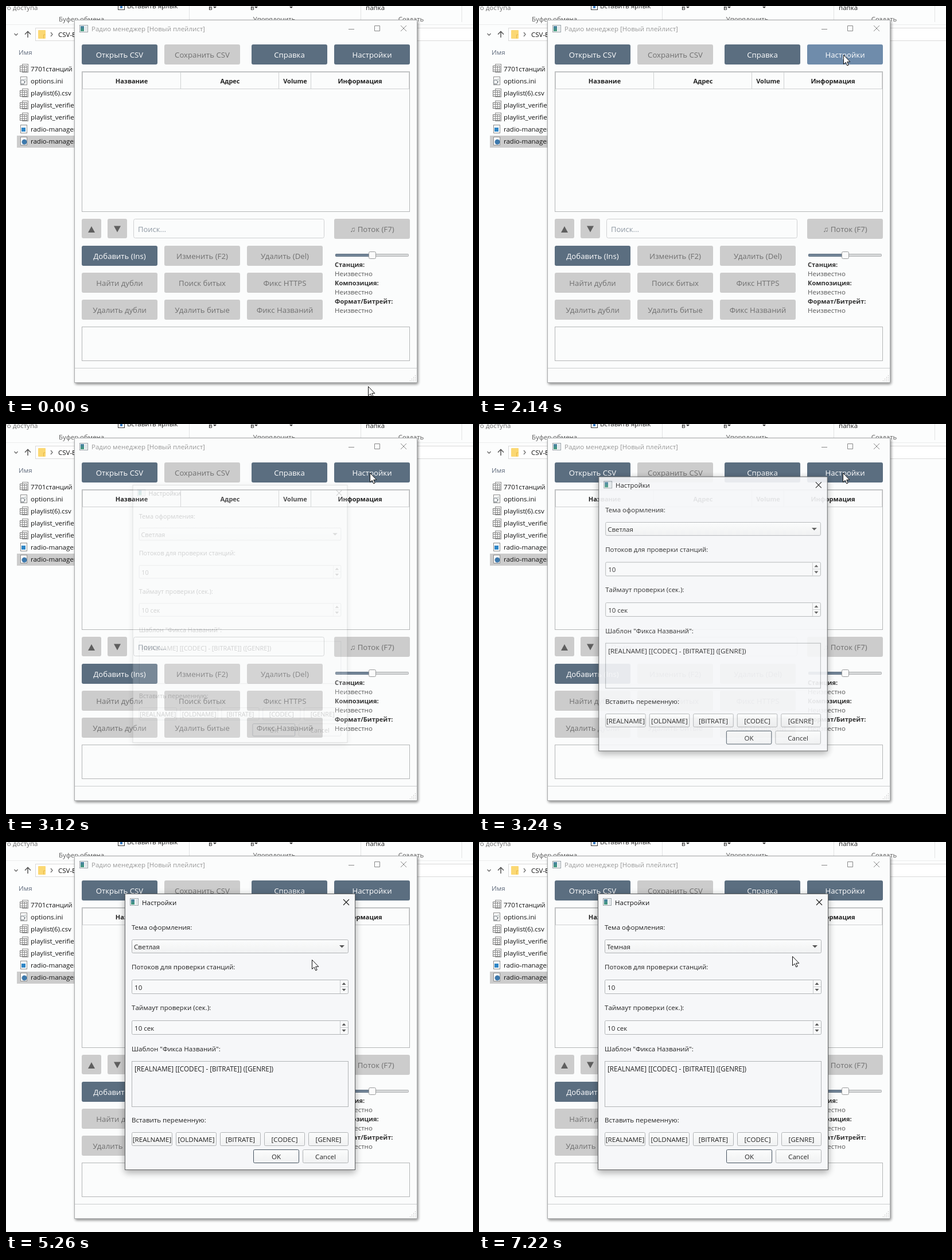
These frames come from a looping animation (814x680 px, 8 s). An HTML page:

```html
<!DOCTYPE html>
<html lang="ru">
<head>
<meta charset="utf-8">
<title>Радио менеджер</title>
<style>
html, body { margin: 0; width: 100%; height: 100%; overflow: hidden; background: #fdfdfd; }
svg { display: block; width: 814px; height: 680px; }
text { font-family: "Open Sans", "Noto Sans", sans-serif; white-space: pre; }
</style>
</head>
<body>
<svg id="stage" viewBox="0 0 814 680" xmlns="http://www.w3.org/2000/svg">
  <defs>
    <filter id="soft" x="-10%" y="-10%" width="120%" height="120%"><feGaussianBlur stdDeviation="2.2"/></filter>
    <filter id="wide" x="-10%" y="-10%" width="120%" height="120%"><feGaussianBlur stdDeviation="6"/></filter>
    <linearGradient id="face" x2="0" y2="1"><stop stop-color="#fbfcfc"/><stop offset="1" stop-color="#f0f1f2"/></linearGradient>
    <linearGradient id="lit" x2="0" y2="1"><stop stop-color="#ffffff"/><stop offset="1" stop-color="#f7f8f9"/></linearGradient>
    <linearGradient id="teal" x2="0" y2="1"><stop stop-color="#4a7fa5"/><stop offset="1" stop-color="#3f9a78"/></linearGradient>
  </defs>
</svg>
<script>
const NS = "http://www.w3.org/2000/svg";
const stage = document.getElementById("stage");
const LOOP = 8000;

function el(parent, tag, attrs, content) {
  const node = document.createElementNS(NS, tag);
  for (const k in attrs) node.setAttribute(k, attrs[k]);
  if (content !== undefined) node.textContent = content;
  parent.appendChild(node);
  return node;
}
const group = (p, attrs = {}) => el(p, "g", attrs);
const rect = (p, x, y, width, height, fill, more = {}) => el(p, "rect", { x, y, width, height, fill, ...more });
const path = (p, d, stroke, more = {}) => el(p, "path", { d, fill: "none", stroke, ...more });
const shape = (p, d, fill) => el(p, "path", { d, fill });
const text = (p, x, y, s, size, fill, more = {}) => el(p, "text", { x, y, "font-size": size, fill, ...more }, s);
const mid = { "text-anchor": "middle" };
const bold = { "font-weight": 700 };

// one pixel outline around whole-pixel bounds
const frame = (p, x1, y1, x2, y2, fill, stroke, rx = 0) =>
  rect(p, x1 + .5, y1 + .5, x2 - x1 - 1, y2 - y1 - 1, fill, { stroke, rx });

function appIcon(p, x, y) {
  frame(p, x, y, x + 15, y + 13, "#f4f6f7", "#9aa3a8");
  rect(p, x + 2, y + 2, 6, 9, "url(#teal)");
  rect(p, x + 10, y + 2, 3, 9, "#dfe5e8");
}

function shadows(p, x, y, w, h) {
  return {
    soft: rect(p, x + 1, y + 2, w + 1, h + 1, "#000", { rx: 4, opacity: .4, filter: "url(#soft)" }),
    wide: rect(p, x - 1, y + 2, w + 2, h + 3, "#000", { rx: 6, opacity: .3, filter: "url(#wide)" })
  };
}

const show = (node, on) => node.setAttribute("visibility", on ? "visible" : "hidden");

/* ---------- file list behind ---------- */
function buildFiles() {
  const g = group(stage);
  rect(g, 0, 0, 814, 680, "#fcfdfd");
  for (const x of [319, 618, 794]) rect(g, x, 0, 1, 28, "#e2e3e4");
  rect(g, 0, 32, 814, 1, "#ececed");

  text(g, -3, 7, "го доступа", 11.5, "#6d6d6d");
  frame(g, 195, -6, 207, 7, "#fff", "#3a3a3a");
  rect(g, 199, 0, 4, 4, "#3f7fc4");
  text(g, 211, 4, "Вставить ярлык", 11.5, "#222");
  text(g, 353, 7, "в", 11.5, "#222");
  text(g, 426, 7, "в", 11.5, "#222");
  for (const x of [361, 433, 494]) shape(g, `M${x} 1h6l-3 3z`, "#333");
  text(g, 627, 7, "папка", 11.5, "#222");
  text(g, 131.5, 27, "Буфер обмена", 11.4, "#5c5c5c", mid);
  text(g, 467.5, 27, "Упорядочить", 11.4, "#5c5c5c", mid);
  text(g, 706, 27, "Создать", 11.4, "#5c5c5c", mid);

  frame(g, 51, 38, 830, 61, "#fff", "#d9d9d9");
  path(g, "M14.5 48l3 3 3-3", "#666", { "stroke-width": 1.3 });
  path(g, "M38 55V44.5M33 49.5l5-5.2 5 5.2", "#555", { "stroke-width": 1.5 });
  rect(g, 56, 42, 13, 15, "#fbd873", { rx: 1 });
  path(g, "M65.5 56.5V50h3", "#e8b84a");
  path(g, "M78 46l3 3.5-3 3.5", "#666", { "stroke-width": 1.2 });
  text(g, 91, 53.5, "CSV-E", 11.5, "#111");
  text(g, 22, 85, "Имя", 11.5, "#5f6b7d");

  rect(g, 19, 226, 110, 21, "#cccccc");
  const files = ["7701станций  р", "options.ini", "playlist(6).csv", "playlist_verified",
    "playlist_verified", "radio-manager", "radio-manager"];
  files.forEach((name, i) => {
    const y = 109 + i * 21 + (i ? .5 : 0);
    text(g, 43, y + 4.5, name, 11.5, "#111");
    fileIcon(g, i, Math.round(y) - 8);
  });
}

function fileIcon(p, i, y) {
  if (i === 0 || (i > 1 && i < 5)) {
    frame(p, 28, y, 39, y + 15, "#fff", "#8a8a8a");
    frame(p, 24, y + 3, 37, y + 14, "#fff", "#777");
    path(p, `M24 ${y + 6.5}h13M24 ${y + 10.5}h13M28.5 ${y + 3}v11M32.5 ${y + 3}v11`, "#888");
    return;
  }
  frame(p, 25, y, 37, y + 15, "#fff", "#8c8c8c");
  if (i === 1) {
    el(p, "circle", { cx: 29, cy: y + 9.5, r: 3.6, fill: "#fff", stroke: "#7e868c", "stroke-width": 2, "stroke-dasharray": "2 .9" });
    path(p, `M32 ${y + 4.5}h3M34 ${y + 7.5}h1.5`, "#9aa");
  } else if (i === 5) {
    rect(p, 27, y + 5, 7, 7, "#2f86c6");
  } else {
    el(p, "circle", { cx: 32, cy: y + 9, r: 4.5, fill: "#3d78ab" });
  }
}

/* ---------- main window ---------- */
function buildMain() {
  const g = group(stage);
  const shade = shadows(g, 119, 24, 598, 633);
  const back = frame(g, 119, 24, 717, 657, "#fbfcfc", "#a9abac");
  appIcon(g, 128, 33);
  const title = text(g, 149, 44, "Радио менеджер [Новый плейлист]", 11.5, "#999");
  const sign = path(g, "M597 40.5h10M642.5 34.5h9v9h-9zM688 34l10 10M698 34l-10 10", "#888");

  const DARK = "#5b6e80", GREY = "#cccccc";
  function button(x, y, label, on, w = 132, h = 35) {
    const box = rect(g, x, y, w, h, on ? DARK : GREY, { rx: 3 });
    text(g, x + w / 2, y + 23, label, 13.2, on ? "#fff" : "#707070", mid);
    return box;
  }
  button(132, 67, "Открыть CSV", true);
  button(276, 67, "Сохранить CSV", false);
  button(428, 67, "Справка", true);
  const options = button(572, 67, "Настройки", true);

  frame(g, 132, 114, 704, 359, "none", "#b4b6b7");
  path(g, "M133 144.5h570M304.5 115v30M475.5 115v30M531.5 115v30M133.5 115v30M702.5 115v30M133 115.5h570", "#cfd1d2");
  [[219, "Название"], [390.5, "Адрес"], [504, "Volume"], [617, "Информация"]]
    .forEach(([x, s]) => text(g, x, 135, s, 11, "#222", { ...mid, ...bold }));

  for (const x of [132, 177]) rect(g, x, 371, 34, 34, GREY, { rx: 3 });
  shape(g, "M143 395h12l-6-11z", "#5f5f5f");
  shape(g, "M188 383.5h12l-6 11z", "#5f5f5f");
  frame(g, 222, 371, 555, 405, "none", "#cfd1d2", 3);
  text(g, 230, 394, "Поиск...", 13, "#8e98a3");
  button(572, 371, "♫ Поток (F7)", false);

  const labels = ["Добавить (Ins)", "Изменить (F2)", "Удалить (Del)", "Найти дубли", "Поиск битых",
    "Фикс HTTPS", "Удалить дубли", "Удалить битые", "Фикс Названий"];
  labels.forEach((s, i) => button(132 + i % 3 * 144, 418 + Math.floor(i / 3) * 47, s, i === 0));

  frame(g, 574, 432, 702, 437, "#d8dadb", "#adafb0", 1);
  frame(g, 574, 432, 636, 437, "#75879a", "#55687a", 1);
  frame(g, 632, 428, 645, 441, "#fbfbfb", "#999b9c", 2);
  ["Станция:", "Композиция:", "Формат/Битрейт:"].forEach((s, i) => {
    text(g, 573, 455 + i * 32, s, 11, "#333", bold);
    text(g, 573, 471 + i * 32, "Неизвестно", 11.5, "#555");
  });

  frame(g, 132, 559, 704, 619, "none", "#b4b6b7");
  rect(g, 120, 631, 596, 1, "#cbcdce");
  for (let r = 0; r < 4; r++)
    for (let c = 0; c <= r; c++) rect(g, 713 - c * 3, 644 + r * 3, 1, 1, "#aaa");

  return (active, hover) => {
    show(shade.soft, !active);
    show(shade.wide, active);
    back.setAttribute("fill", active ? "#f9f9fa" : "#fbfcfc");
    back.setAttribute("stroke", active ? "#6a6c6d" : "#a9abac");
    title.setAttribute("fill", active ? "#111" : "#999");
    sign.setAttribute("stroke", active ? "#111" : "#888");
    options.setAttribute("fill", hover ? "#6f8cab" : DARK);
  };
}

/* ---------- settings dialog ---------- */
function buildDialog() {
  const g = group(stage);
  const INK = "#222", EDGE = "#b1b4b6", SIZE = 11.6;
  show(shadows(g, 207, 90, 402, 482).soft, false);
  frame(g, 207, 90, 609, 572, "#f6f7f9", "#5e6061");
  appIcon(g, 216, 98);
  text(g, 237, 110, "Настройки", 11.5, "#111");
  const closeBack = rect(g, 577, 91, 31, 30, "#e81123");
  const cross = path(g, "M588 100l10 10M598 100l-10 10", "#222", { "stroke-width": 1.2 });

  [[153, "Тема оформления:"], [222, "Потоков для проверки станций:"], [293, "Таймаут проверки (сек.):"],
    [365, "Шаблон \"Фикса Названий\":"], [489, "Вставить переменную:"]]
    .forEach(([y, s]) => text(g, 219, y, s, SIZE, INK));

  const combo = frame(g, 219, 170, 597, 194, "url(#face)", EDGE, 2);
  const choice = text(g, 223, 187, "", SIZE, INK);
  shape(g, "M581 180h9l-4.5 4.5z", "#555");

  [[240, "10"], [311, "10 сек"]].forEach(([y, s]) => {
    frame(g, 219, y, 597, y + 25, "#f8f9fa", EDGE, 2);
    path(g, `M582.5 ${y + 1}v23M583 ${y + 12.5}h13`, "#c9cbcd");
    text(g, 224, y + 18, s, SIZE, INK);
    shape(g, `M585.5 ${y + 9}h7l-3.5-4zM585.5 ${y + 16}h7l-3.5 4z`, "#5a5a5a");
  });

  frame(g, 219, 382, 597, 462, "none", EDGE);
  text(g, 224, 400, "[REALNAME] [[CODEC] - [BITRATE]] ([GENRE])", 11.7, INK);

  function button(x, y, w, s, edge = EDGE) {
    frame(g, x, y, x + w, y + 24, "url(#face)", edge, 2);
    text(g, x + w / 2, y + 17, s, SIZE, INK, mid);
  }
  ["[REALNAME]", "[OLDNAME]", "[BITRATE]", "[CODEC]", "[GENRE]"]
    .forEach((s, i) => button(219 + i * 77, 506, i < 4 ? 71 : 70, s));
  button(431, 536, 80, "OK", "#44525f");
  button(517, 536, 80, "Cancel");

  const popup = group(g);
  rect(popup, 221, 172, 379, 51, "#000", { opacity: .12 });
  frame(popup, 219, 170, 597, 220, "#fbfcfc", "#a4a7a9");
  const bar = rect(popup, 220, 171, 376, 24, "#308cc6");
  const rows = ["Светлая", "Темная"].map((s, i) => text(popup, 241, 187 + i * 24, s, SIZE, INK));
  const tick = path(popup, "M226 182l3 3.5 5-7", INK, { "stroke-width": 1.6 });

  return s => {
    show(g, s.grow > 0);
    g.setAttribute("opacity", Math.pow(s.grow, 1.5));
    g.setAttribute("transform", `translate(408 331) scale(${.9 + .1 * s.grow}) translate(-408 -331)`);
    closeBack.setAttribute("opacity", s.closeHover ? 1 : 0);
    cross.setAttribute("stroke", s.closeHover ? "#fff" : "#222");
    combo.setAttribute("fill", s.comboHover ? "url(#lit)" : "url(#face)");
    choice.textContent = s.dark ? "Темная" : "Светлая";
    popup.setAttribute("opacity", s.popup ? 1 : 0);
    bar.setAttribute("y", s.row ? 195 : 171);
    rows.forEach((r, i) => r.setAttribute("fill", i === s.row ? "#fff" : INK));
    tick.setAttribute("stroke", s.row ? INK : "#fff");
  };
}

/* ---------- pointer path: time, x, y ---------- */
const TRACK = [
  [870, 631, 663], [1000, 600, 615], [1130, 560, 545], [1250, 546, 430], [1380, 544, 320],
  [1510, 560, 250], [1630, 590, 184], [1780, 612, 142], [1950, 630, 105], [2140, 635, 85],
  [2830, 635, 85], [2890, 634, 85], [3880, 634, 85], [3910, 631, 89], [4210, 617, 101],
  [4360, 617, 101], [4520, 598, 110], [4680, 580, 127], [4840, 562, 152], [5000, 548, 174],
  [5140, 540, 188], [5180, 540, 188], [5260, 533, 205], [5380, 528, 217], [5530, 528, 217],
  [5680, 538, 190], [5830, 545, 172], [5980, 545, 172], [6010, 537, 173], [6320, 537, 173],
  [6560, 541, 188], [6770, 546, 198], [6950, 546, 198], [6980, 546, 199]
];

function pointerAt(t) {
  const i = TRACK.findIndex(k => k[0] > t);
  if (i === 0) return TRACK[0].slice(1);
  if (i < 0) return TRACK[TRACK.length - 1].slice(1);
  const a = TRACK[i - 1], b = TRACK[i], f = (t - a[0]) / (b[0] - a[0]);
  return [1, 2].map(n => Math.round(a[n] + (b[n] - a[n]) * f));
}

const inside = (x, y, x1, y1, x2, y2) => x >= x1 && x < x2 && y >= y1 && y < y2;

buildFiles();
const drawMain = buildMain();
const drawDialog = buildDialog();
const pointer = el(stage, "path", {
  d: "M.5 .5V16.5L4.2 13.2L6.8 19L9.2 18L6.7 12.3H11.8Z", fill: "#fff", stroke: "#111", "stroke-linejoin": "round"
});

const OPEN = 3090;
function draw(t) {
  const [x, y] = pointerAt(t);
  const opened = t >= OPEN;
  const left = 1 - Math.min(1, Math.max(0, (t - OPEN) / 250));
  const popup = t >= 5770 && t < 7160;
  drawMain(t >= 2830 && !opened, !opened && inside(x, y, 572, 67, 704, 102));
  drawDialog({
    grow: 1 - left ** 3,
    closeHover: opened && inside(x, y, 577, 91, 608, 121),
    comboHover: opened && inside(x, y, 219, 170, 597, 194),
    dark: t >= 7160,
    popup,
    row: popup && y >= 195 ? 1 : 0
  });
  pointer.setAttribute("transform", `translate(${x} ${y})`);
}

function tick() {
  draw(performance.now() % LOOP);
  requestAnimationFrame(tick);
}
tick();
</script>
</body>
</html>
```
